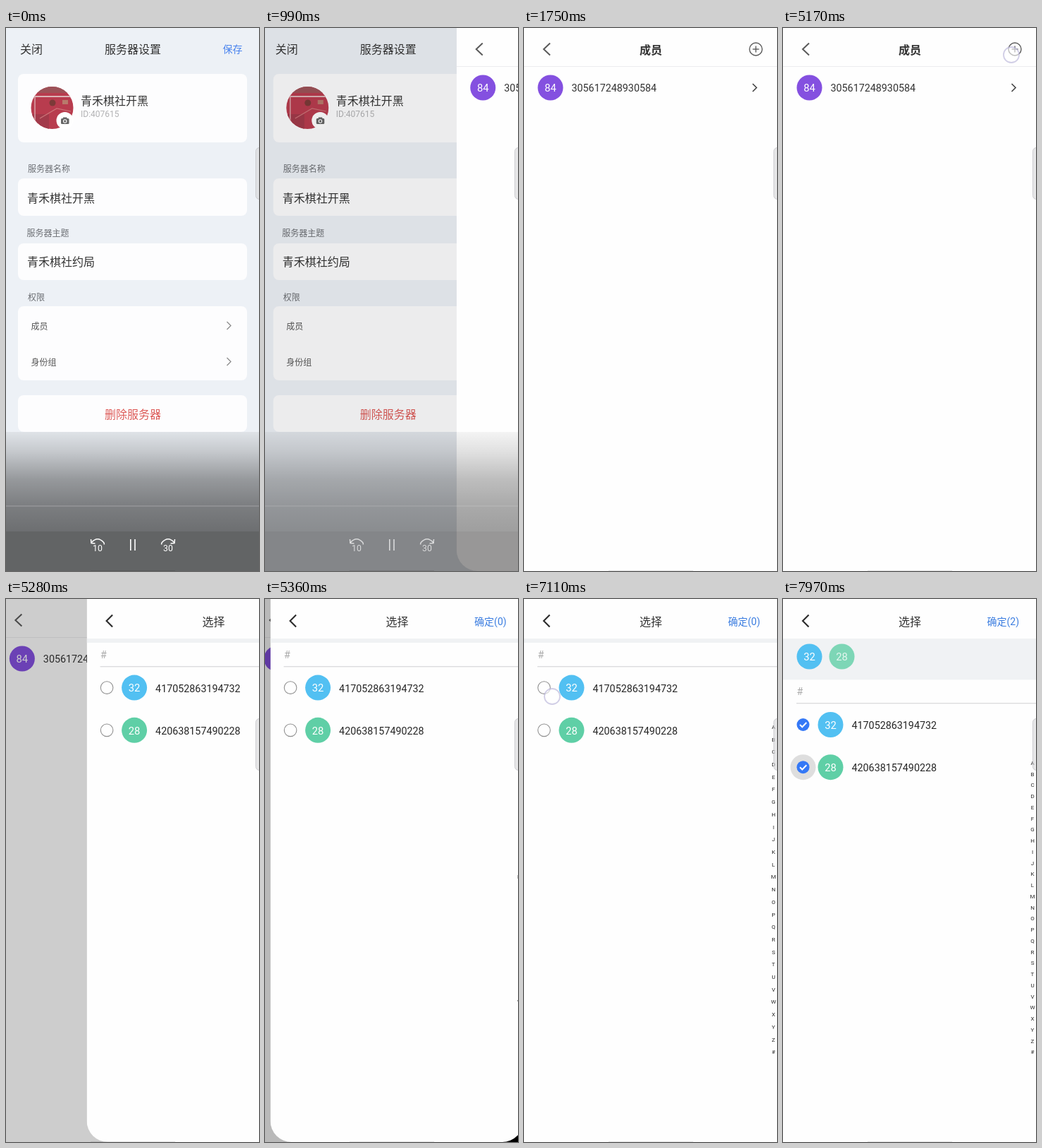
These frames come from a looping animation (359x769 px, 8 s). An HTML page with a canvas:

```html
<!DOCTYPE html>
<html lang="zh-CN">
<head>
<meta charset="utf-8">
<style>
html, body { margin: 0; width: 100%; height: 100%; overflow: hidden; background: #fff; }
canvas { display: block; width: 359px; height: 769px; }
</style>
</head>
<body>
<canvas></canvas>
<script>
const W = 359, H = 769, LOOP = 8000;
const FAMILY = 'Roboto, "Noto Sans CJK SC", "Noto Sans CJK", sans-serif';
const canvas = document.querySelector('canvas');
const dpr = window.devicePixelRatio || 1;
canvas.width = Math.round(W * dpr);
canvas.height = Math.round(H * dpr);
const c = canvas.getContext('2d');
c.scale(dpr, dpr);

const clamp = v => Math.max(0, Math.min(1, v));
const progress = (t, start, length) => clamp((t - start) / length);
const between = (t, a, b) => t >= a && t < b;

// Text is placed by the vertical middle of its glyphs.
function text(str, x, midY, size, color, align = 'left', weight = 400) {
  const cjk = /[\u4e00-\u9fff]/.test(str);
  c.font = `${weight} ${size}px ${FAMILY}`;
  c.textAlign = align;
  c.textBaseline = 'alphabetic';
  c.fillStyle = color;
  c.fillText(str, x, midY + size * (cjk ? 0.38 : 0.355));
}

function rect(x, y, w, h, color) {
  c.fillStyle = color;
  c.fillRect(x, y, w, h);
}

function rounded(x, y, w, h, r, color) {
  c.beginPath();
  c.roundRect(x, y, w, h, r);
  c.fillStyle = color;
  c.fill();
}

function disc(x, y, r, color) {
  c.beginPath();
  c.arc(x, y, r, 0, Math.PI * 2);
  c.fillStyle = color;
  c.fill();
}

function circle(x, y, r, color, width) {
  c.beginPath();
  c.arc(x, y, r, 0, Math.PI * 2);
  c.strokeStyle = color;
  c.lineWidth = width;
  c.stroke();
}

function line(color, width, ...points) {
  c.beginPath();
  points.forEach(([x, y]) => c.lineTo(x, y));
  c.strokeStyle = color;
  c.lineWidth = width;
  c.stroke();
}

function chevron(x, y, dx, dy, color, width) {
  line(color, width, [x - dx, y - dy], [x, y], [x - dx, y + dy]);
}

function avatar(x, y, label, color) {
  disc(x, y, 18, color);
  text(label, x, y + 0.5, 14.8, '#fff', 'center');
}

function touch(x, y) {
  disc(x, y, 11, 'rgba(255,255,255,.6)');
  circle(x, y, 11, 'rgba(184,180,216,.65)', 1.8);
}

function groupPicture() {
  c.save();
  c.beginPath();
  c.arc(65.5, 113, 30, 0, Math.PI * 2);
  c.clip();
  rect(35, 83, 61, 61, '#b83c4e');
  rect(35, 83, 61, 9, '#9c5258');
  rect(35, 122, 26, 22, '#a23a4a');
  line('#dcb4b6', 2, [36, 97], [96, 97]);
  line('#d8a4a8', 1.5, [41, 92], [41, 138]);
  disc(66, 106, 4.5, '#7c3a38');
  rect(80, 102, 8, 6, '#b87a6c');
  line('#cc7478', 1.2, [48, 128], [72, 114], [92, 118]);
  c.restore();

  disc(83.5, 131, 12, '#fff');
  rounded(78, 128, 11.5, 8, 1.5, '#666');
  rect(81, 126.5, 5.5, 2, '#666');
  circle(83.7, 132, 2.2, '#fff', 1.1);
}

function settingsPage() {
  rect(0, 0, W, H, '#edf1f6');
  text('关闭', 20, 30, 16, '#333');
  text('服务器设置', 180, 30, 16, '#333', 'center');
  text('保存', 307.5, 30, 14, '#4a84ee');

  [[65, 97], [213, 53], [305, 52], [394, 105], [520, 52]]
    .forEach(([y, h]) => rounded(17, y, 325, h, 8, '#fdfdfe'));
  groupPicture();
  text('青禾棋社开黑', 106, 103, 16, '#333');
  text('ID:407615', 106, 122, 12, '#b2b2b4');

  text('服务器名称', 31, 199.5, 12, '#6c6f74');
  text('青禾棋社开黑', 30, 240.5, 16, '#333');
  text('服务器主题', 29.5, 290, 12, '#6c6f74');
  text('青禾棋社约局', 30, 331, 16, '#333');
  text('权限', 31, 381, 12, '#6c6f74');
  text('成员', 35.5, 422, 12, '#555');
  text('身份组', 35.5, 473, 12, '#555');
  chevron(319, 421.5, 5.5, 5.5, '#888', 1.2);
  chevron(319, 472.5, 5.5, 5.5, '#888', 1.2);
  text('删除服务器', 180, 547, 16, '#dd5b58', 'center');
}

function membersPage() {
  rect(0, 0, W, H, '#fefefe');
  chevron(28, 30, -9, 8.5, '#5a5a5a', 2);
  text('成员', 180, 30.5, 16, '#333', 'center', 700);
  circle(329, 30, 9, '#5c5c5c', 1.4);
  line('#5c5c5c', 1.4, [324.5, 30], [333.5, 30]);
  line('#5c5c5c', 1.4, [329, 25.5], [329, 34.5]);
  rect(0, 54, W, 1, '#ececee');
  avatar(37.5, 84.5, '84', '#8450e0');
  text('305617248930584', 67.5, 85, 14.3, '#333');
  chevron(330, 84.5, 5.5, 5.5, '#444', 1.6);
}

const PEOPLE = [
  { tag: '32', id: '417052863194732', color: '#52c0f2', tick: 7220 },
  { tag: '28', id: '420638157490228', color: '#5fcfa6', tick: 7860 },
];

function checkbox(x, y, t, tick) {
  const grow = progress(t, tick - 40, 120);
  const fade = 1 - progress(t, tick + 130, 100);
  if (grow && fade) disc(x, y, 18 * grow, `rgba(0,0,0,${0.125 * fade})`);
  if (t < tick) {
    circle(x, y, 8.8, '#909090', 1.1);
    return;
  }
  disc(x, y, 9, '#3478f6');
  line('#fff', 2, [x - 4.5, y], [x - 1.2, y + 3.3], [x + 4.8, y - 3]);
}

function pickerPage(t) {
  const chosen = PEOPLE.filter(p => t >= p.tick);
  const open = chosen.length > 0;
  const shift = open ? 52.4 : 0;

  rect(0, 0, W, H, '#fefefe');
  chevron(28, 31, -8.5, 8.5, '#2c2c2c', 2.1);
  text('选择', 180, 32, 16, '#333', 'center');
  text(`确定(${chosen.length})`, 289.5, 32, 14, '#3b7de0');
  rect(0, 56, W, open ? 58.4 : 6, '#f0f2f4');

  chosen.forEach((p, i) => {
    c.globalAlpha = progress(t, p.tick, 140);
    avatar(37.5 + 46 * i, 81.5, p.tag, p.color);
    c.globalAlpha = 1;
  });

  text('#', 19.5, 79 + shift, 14.3, '#aaa');
  rect(19, Math.round(94.5 + shift), W - 19, 1.4, '#dcdcde');
  PEOPLE.forEach((p, i) => {
    const y = 125.6 + 60.2 * i + shift;
    checkbox(28.5, y, t, p.tick);
    avatar(67.5, y, p.tag, p.color);
    text(p.id, 97.5, y + 1, 14.3, '#262626');
  });

  const top = open ? 232 : 181, step = (641.5 - top) / 26;
  [...'ABCDEFGHIJKLMNOPQRSTUVWXYZ#'].forEach((ch, i) =>
    text(ch, 354, top + step * i, 8, '#2a2a2a', 'center'));
}

function slideIn(below, above, t, start) {
  const u = progress(t, start, 240);
  if (u === 0) return below();
  if (u === 1) return above();
  const p = 1 - (1 - u) ** 5;

  rect(0, 0, W, H, '#000');
  c.save();
  c.translate(-21.5 * p, 0);
  below();
  rect(0, 0, W, H, `rgba(0,0,0,${0.28 * p})`);
  c.restore();

  c.save();
  c.translate(W * (1 - p), 0);
  c.beginPath();
  c.roundRect(0, 0, W, H, [0, 0, 30, 30]);
  c.clip();
  above();
  c.restore();
}

function skipButton(x, label, dir) {
  c.save();
  c.translate(x, 0);
  c.scale(dir, 1);
  c.beginPath();
  c.moveTo(-9, 729);
  c.quadraticCurveTo(0, 718.5, 9, 729);
  c.lineTo(9.5, 731.5);
  c.strokeStyle = '#fff';
  c.lineWidth = 1.5;
  c.stroke();
  line('#fff', 1.5, [-9.5, 724], [-9, 729.5], [-3.5, 730]);
  c.restore();
  text(label, x, 737, 12.3, '#fff', 'center');
}

function playerControls(alpha) {
  if (alpha <= 0) return;
  c.save();
  c.globalAlpha = alpha;
  const shade = c.createLinearGradient(0, 572, 0, 713);
  [[0, 0.06], [0.2, 0.17], [0.48, 0.37], [0.74, 0.48], [1, 0.54]]
    .forEach(([at, a]) => shade.addColorStop(at, `rgba(0,0,0,${a})`));
  rect(0, 572, W, 141, shade);
  rect(0, 713, W, H - 713, 'rgba(3,2,0,.59)');
  rect(0, 676, W, 2, 'rgba(255,255,255,.14)');
  skipButton(130, '10', 1);
  rect(176, 724, 1.6, 16, '#fff');
  rect(182.2, 724, 1.6, 16, '#fff');
  skipButton(230, '30', -1);
  c.restore();
}

function sideHandle() {
  c.beginPath();
  c.roundRect(354.5, 169.5, 12, 73, 5);
  c.fillStyle = 'rgba(217,217,219,.6)';
  c.fill();
  c.strokeStyle = 'rgba(190,190,194,.7)';
  c.lineWidth = 1;
  c.stroke();
}

function draw(t) {
  if (t < 3000) slideIn(settingsPage, membersPage, t, 978);
  else slideIn(membersPage, () => pickerPage(t), t, 5232);

  if (between(t, 5170, 5232)) touch(324, 38);
  if (between(t, 7110, 7200)) touch(40, 138);
  if (between(t, 7730, 7840)) touch(37, 246);

  sideHandle();
  playerControls(1 - progress(t, 820, 560));
  rect(120, 768, 120, 1, 'rgba(0,0,0,.1)');
}

function frame() {
  draw(performance.now() % LOOP);
  requestAnimationFrame(frame);
}
frame();
</script>
</body>
</html>
```
